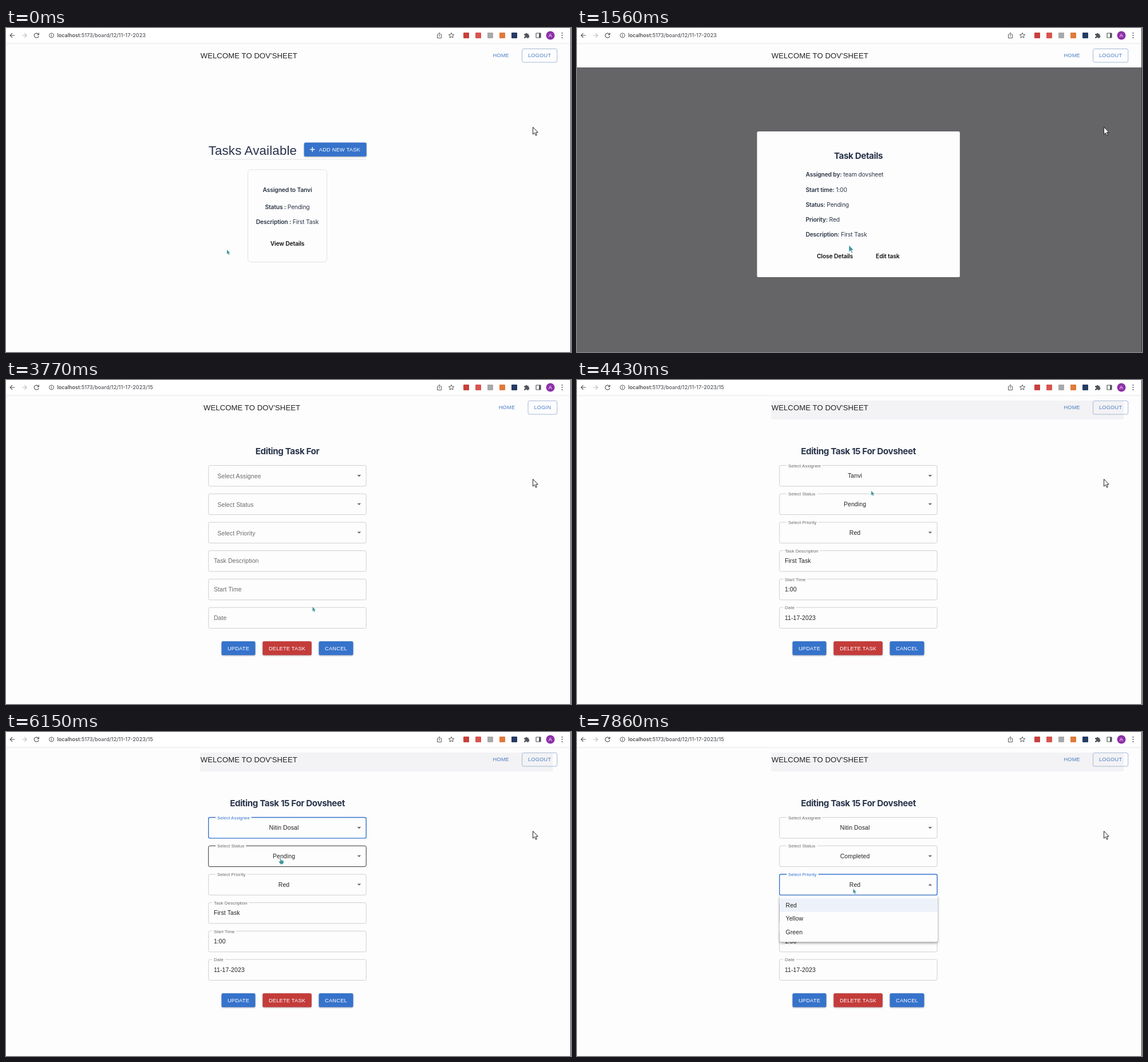
These frames come from a looping animation (987x567 px, 8000 ms). An HTML page:

```html
<!DOCTYPE html>
<html lang="en">
<head>
<meta charset="utf-8">
<title>Task board</title>
<style>
  html, body { margin: 0; width: 100%; height: 100%; overflow: hidden; background: #fdfdfe; }
  svg { display: block; width: 987px; height: 567px; }
  text { font-family: "Liberation Sans", Arial, sans-serif; font-size: 10.5px; letter-spacing: .1px; fill: #222; white-space: pre; }
  .ui { font-family: Inter, sans-serif; font-size: 10.3px; letter-spacing: -.15px; fill: #2b3545; }
  .strong { font-weight: 600; }
  .action { font-weight: 600; fill: #111; }
  .h2 { font-family: Inter, sans-serif; font-size: 15.2px; font-weight: 700; letter-spacing: -.4px; fill: #29344a; }
  .h4 { font-size: 22.3px; letter-spacing: .16px; fill: #28324a; }
  .h6 { font-size: 13.1px; }
  .btn { font-size: 9.2px; letter-spacing: .26px; }
  .url { font-family: Inter, sans-serif; font-size: 9.1px; font-weight: 500; letter-spacing: 0; fill: #55585d; }
  .label { font-size: 7.87px; letter-spacing: .07px; stroke: #fdfdfe; stroke-width: 6.6px; paint-order: stroke; stroke-linejoin: round; }
  .mid { text-anchor: middle; }
  .raised { filter: drop-shadow(0 1px 1px rgba(0, 0, 0, .32)); }
  .menu { filter: drop-shadow(0 2px 2.2px rgba(0, 0, 0, .42)); }
  .icon { fill: none; stroke: #55585d; stroke-width: 1.2; }
</style>
</head>
<body>
<svg id="stage" viewBox="0 0 987 567"></svg>
<script>
const LOOP = 8000;
const BLUE = '#3673cb', RED = '#c33c3a', PAGE = '#fdfdfe', GREY = '#f3f2f4';
const BRAND = "DOV'SHEET", TEAM = 'Dovsheet';
const PEOPLE = ['Tanvi', 'Nitin Dosal', 'team dovsheet'];
const stage = document.getElementById('stage');

const text = (x, y, s, cls = '', fill = '') =>
  `<text x="${x}" y="${y}" class="${cls}"${fill && ` style="fill:${fill}"`}>${s}</text>`;
const rect = (x, y, w, h, fill, r = 0, extra = '') =>
  `<rect x="${x}" y="${y}" width="${w}" height="${h}" rx="${r}" fill="${fill}" ${extra}/>`;
const box = (x, y, w, h, stroke, r = 2.6, width = 1) =>
  rect(x, y, w, h, 'none', r, `stroke="${stroke}" stroke-width="${width}"`);
const path = (d, extra = 'class="icon"') => `<path d="${d}" ${extra}/>`;
const button = (x, y, w, s, fill) =>
  rect(x, y, w, 24.3, fill, 2.6, 'class="raised"') + text(x + w / 2, y + 15.2, s, 'btn mid', '#fff');
const pair = (x, y, name, value, cls = '') =>
  text(x, y, `<tspan class="strong">${name}</tspan> ${value}`, 'ui ' + cls);

function toolbar(s) {
  const squares = [[804, '#c8403c'], [825, '#d9534f'], [846, '#a9a9ab'], [867, '#e07a3a'], [888, '#263b63']];
  return rect(0, 0, 987, 27, '#fff') +
    (s.loading ? path('M578 8H76a8 8 0 0 0 0 16H578z', 'fill="#f2f2f3"') : '') +
    rect(0, 26.5, 987, 1, '#e6e6e9') +
    path('M15.5 13H7.5M11 9.2L7.2 13L11 16.8') +
    path('M28 13H36M32.3 9.2L36.1 13L32.3 16.8', 'class="icon" style="stroke:#bcbdc0"') +
    (s.loading ? path('M49.5 9.5L56.5 16.5M56.5 9.5L49.5 16.5')
      : path('M56.4 10.6A4 4 0 1 0 57.2 14M57.4 8.6V11.6H54.2')) +
    path('M75.5 13a4 4 0 1 0 8 0a4 4 0 1 0 -8 0M79.5 12.4V15.4M79.5 10.4V11.5', 'class="icon" style="stroke-width:1"') +
    text(89.5, 16.3, `<tspan fill="#35373b">localhost</tspan>:5173/board/12/11-17-2023${s.deep ? '/15' : ''}`, 'url') +
    path('M755 11.5H753.5V17.5H760.5V11.5H759M757 15V8.5M755 10.3L757 8.3L759 10.3', 'class="icon" style="stroke-width:1"') +
    path('M778 8.3L779.4 11.4L782.7 11.7L780.2 13.9L781 17.2L778 15.4L775 17.2L775.8 13.9L773.3 11.7L776.6 11.4Z', 'class="icon" style="stroke-width:1"') +
    squares.map(([x, c]) => rect(x - 5, 8, 10, 10, c, 1)).join('') +
    path('M905 10.3h2.6a1.5 1.5 0 1 1 3 0h2.4v2.6a1.5 1.5 0 1 1 0 3v1.9h-2.6a1.4 1.4 0 1 0 -2.8 0h-2.6v-2.4a1.5 1.5 0 1 0 0 -2.9z', 'fill="#505358"') +
    box(926, 9, 8, 8, '#505358', .5, 1.2) + rect(931, 9, 3, 8, '#505358') +
    '<circle cx="951" cy="13" r="7.5" fill="#8e2fa8"/>' + text(951, 16, 'A', 'mid btn', '#fff') +
    [9, 13, 17].map(y => `<circle cx="971.5" cy="${y}" r="1.05" fill="#505358"/>`).join('');
}

function header(s) {
  const login = s.view === 'blank';
  const x = login ? 912 : 901.5;
  return (s.loading ? rect(48, 27, 530, 42, '#f3f3f4') : '') +
    (s.view === 'form' ? rect(339, 36, 616, 33, GREY) : '') +
    text(login ? 345 : 339.7, 52.6, 'WELCOME TO ' + BRAND, 'h6') +
    text(login ? 875 : 864.7, 51.4, 'HOME', 'btn mid', '#4a7cc4') +
    box(x, 36.5, 962.7 - x, 23.5, '#a6b9d6') +
    text((x + 962.7) / 2, 51.4, login ? 'LOGIN' : 'LOGOUT', 'btn mid', '#4a7cc4');
}

function board(s) {
  return text(353.7, 222, 'Tasks Available', 'h4') +
    rect(363, 229.5, 266, 1, '#e4e4e8') +
    rect(520.7, 200.5, 109, 24.3, BLUE, 2.6, 'class="raised"') +
    path('M535.3 208.3V216.7M531.1 212.5H539.5', 'stroke="#fff" stroke-width="1.3"') +
    text(546.8, 215.7, 'ADD NEW TASK', 'btn', '#fff') +
    box(422.5, 247.8, 138, 161.7, '#e1e1e5', 5.3) +
    text(491.5, 286.8, 'Assigned to ' + PEOPLE[0], 'ui strong mid') +
    pair(491.5, 316.6, 'Status :', 'Pending', 'mid') +
    pair(491.5, 342.8, 'Description :', 'First Task', 'mid') +
    (s.hot ? box(449, 364, 85, 25.5, '#8b86e6', 5) : '') +
    text(491.5, 380.6, 'View Details', 'ui action mid');
}

function details(s) {
  const rows = [['Assigned by:', PEOPLE[2]], ['Start time:', '1:00'], ['Status:', 'Pending'],
    ['Priority:', 'Red'], ['Description:', 'First Task']];
  return rect(0, 69, 987, 498, '#656567') + rect(314.5, 181, 354.3, 255, PAGE, 2.6) +
    text(491.5, 229.4, 'Task Details', 'h2 mid') +
    rows.map(([k, v], i) => pair(399.4, 260.3 + 26.2 * i, k, v)).join('') +
    text(450.5, 402.8, 'Close Details', 'ui action mid') +
    (s.hot ? box(509, 386, 68, 25.5, '#8b86e6', 5) : '') +
    text(542.8, 402.8, 'Edit task', 'ui action mid');
}

const fieldTop = i => 149.5 + 49.72 * i;
const labels = ['Select Assignee', 'Select Status', 'Select Priority', 'Task Description', 'Start Time', 'Date'];

function field(s, i) {
  const y = fieldTop(i), select = i < 3, filled = s.view === 'form';
  const focus = s.focus === i, hover = s.hover === i;
  const value = [s.person, s.status, 'Red', 'First Task', '1:00', '11-17-2023'][i];
  let out = box(353.7, y, 275.5, 36.4, focus ? BLUE : hover ? '#333' : '#cfcfd3', 2.6, focus ? 1.4 : 1);
  if (filled) {
    out += text(select ? 369 : 363, y + 3.2, labels[i], 'label', focus ? BLUE : '#6a6a6c') +
      (select ? text(485.5, y + 21.8, value, 'mid') : text(362.9, y + 21.8, value));
  } else {
    out += text(select ? 369.4 : 362.9, y + (select ? 22.6 : 21.6), labels[i], '', '#6a6a6c');
  }
  if (select) {
    const up = s.menu === i;
    out += path(`M613.6 ${y + (up ? 19.8 : 16.6)}h6.6l-3.3 ${up ? -3.3 : 3.3}z`, 'fill="#6a6a6c"');
  }
  return out;
}

function menu(s) {
  if (s.menu < 0) return '';
  const items = [PEOPLE, ['Pending', 'Completed'], ['Red', 'Yellow', 'Green']][s.menu];
  const y = fieldTop(s.menu) + 37, row = 23.6;
  const tint = i => i === 0 ? (s.row === 0 ? '#d6e0f4' : '#edf2fa') : s.row === i ? '#f4f4f5' : '';
  return `<g class="menu" opacity="${s.fade}">` + rect(354, y, 276, row * items.length + 10.4, PAGE, 2.6) +
    items.map((item, i) => {
      const top = y + 5.2 + row * i;
      return (tint(i) ? rect(354, top, 276, row, tint(i)) : '') + text(364.5, top + 15.4, item);
    }).join('') + '</g>';
}

function form(s) {
  const title = s.view === 'form' ? 'Editing Task 15 For ' + TEAM : 'Editing Task For';
  return text(491.5, 130.3, title, 'h2 mid') + labels.map((_, i) => field(s, i)).join('') +
    button(376.5, 457.3, 59, 'UPDATE', BLUE) + button(448.3, 457.3, 85.5, 'DELETE TASK', RED) +
    button(546.5, 457.3, 60, 'CANCEL', BLUE) + menu(s);
}

function pointers(s) {
  const arrow = 'M0 0V12.6L2.9 9.9L4.9 14.6L6.9 13.7L4.9 9.2H8.8Z';
  const hand = 'M2 0L3.4 .3L4 3.2L8 4.2L8.6 7L7 10.2H3L0 6L.6 5.2L2.4 6Z';
  const at = `transform="translate(${s.at})`;
  return path(arrow, 'transform="translate(920.5 173.5)" fill="#fff" stroke="#222" stroke-width="1"') +
    (s.hand ? path(hand, `${at}" fill="#3d969b" stroke="#b9dcdc" stroke-width=".6"`)
      : path(arrow, `${at} scale(${s.big ? .95 : .62})" fill="#3d8f96" stroke="${s.big ? '#eef8f8' : '#a9cfd2'}" stroke-width=".8"`));
}

const views = { board, details, blank: form, form };

// Each step adds to the state before it.
const steps = [
  [0, { view: 'board', deep: 0, loading: 0, hot: 0, hand: 0, big: 0, at: [386, 388],
    menu: -1, focus: -1, hover: -1, row: 0, fade: 1, person: PEOPLE[0], status: 'Pending' }],
  [800, { at: [402, 388] }],
  [930, { at: [436, 385] }],
  [1060, { at: [466, 382], hot: 1, hand: 1 }],
  [1190, { at: [475, 380] }],
  [1560, { view: 'details', hot: 0, hand: 0, big: 1 }],
  [2260, { at: [480, 367], big: 0 }],
  [2400, { at: [490, 353] }],
  [2540, { at: [506, 350] }],
  [2680, { at: [523, 366] }],
  [2810, { at: [533, 388], hot: 1 }],
  [2950, { at: [535.5, 397] }],
  [3380, { deep: 1, loading: 1 }],
  [3770, { view: 'blank', loading: 0, hot: 0 }],
  [3890, { view: 'form', at: [533, 372] }],
  [4020, { at: [524, 290] }],
  [4160, { at: [517, 226], hover: 1 }],
  [4310, { at: [514, 194], hover: -1 }],
  [4450, { at: [512, 181], hover: 0 }],
  [4590, { at: [512, 179] }],
  [4720, { focus: 0, hover: -1 }],
  [4860, { menu: 0, fade: .6, row: -1 }],
  [4990, { fade: 1 }],
  [5120, { row: 0 }],
  [5270, { at: [506, 190] }],
  [5420, { at: [500, 205], hand: 1 }],
  [5570, { at: [490, 223], row: 1 }],
  [5850, { person: PEOPLE[1], fade: .5 }],
  [5990, { menu: -1, at: [483, 222] }],
  [6150, { hover: 1, at: [476.5, 221] }],
  [6310, { focus: 1, hover: -1 }],
  [6430, { menu: 1, fade: .6, row: -1, hand: 0 }],
  [6570, { fade: 1, at: [478, 229] }],
  [6700, { at: [479, 248], row: 0, hand: 1 }],
  [6840, { at: [480, 262] }],
  [6960, { at: [482, 272], row: 1 }],
  [7110, { status: 'Completed', fade: .5 }],
  [7260, { menu: -1, hover: 2, hand: 1 }],
  [7400, { at: [482.5, 274.5] }],
  [7550, { focus: 2, hover: -1 }],
  [7700, { menu: 2, fade: .6, row: -1, hand: 0 }],
  [7860, { fade: 1 }]
];
let last = {};
const states = steps.map(([, change]) => (last = { ...last, ...change }));

let shown = -1;
function draw(now) {
  const t = now % LOOP;
  const i = steps.findLastIndex(([start]) => start <= t);
  if (i !== shown) {
    const s = states[shown = i];
    stage.innerHTML = rect(0, 0, 987, 567, PAGE) + toolbar(s) + header(s) + views[s.view](s) +
      pointers(s) + rect(986, 0, 1, 567, '#333');
  }
}
const begin = performance.now();
function tick() {
  draw(performance.now() - begin);
  requestAnimationFrame(tick);
}
tick();
</script>
</body>
</html>
```
